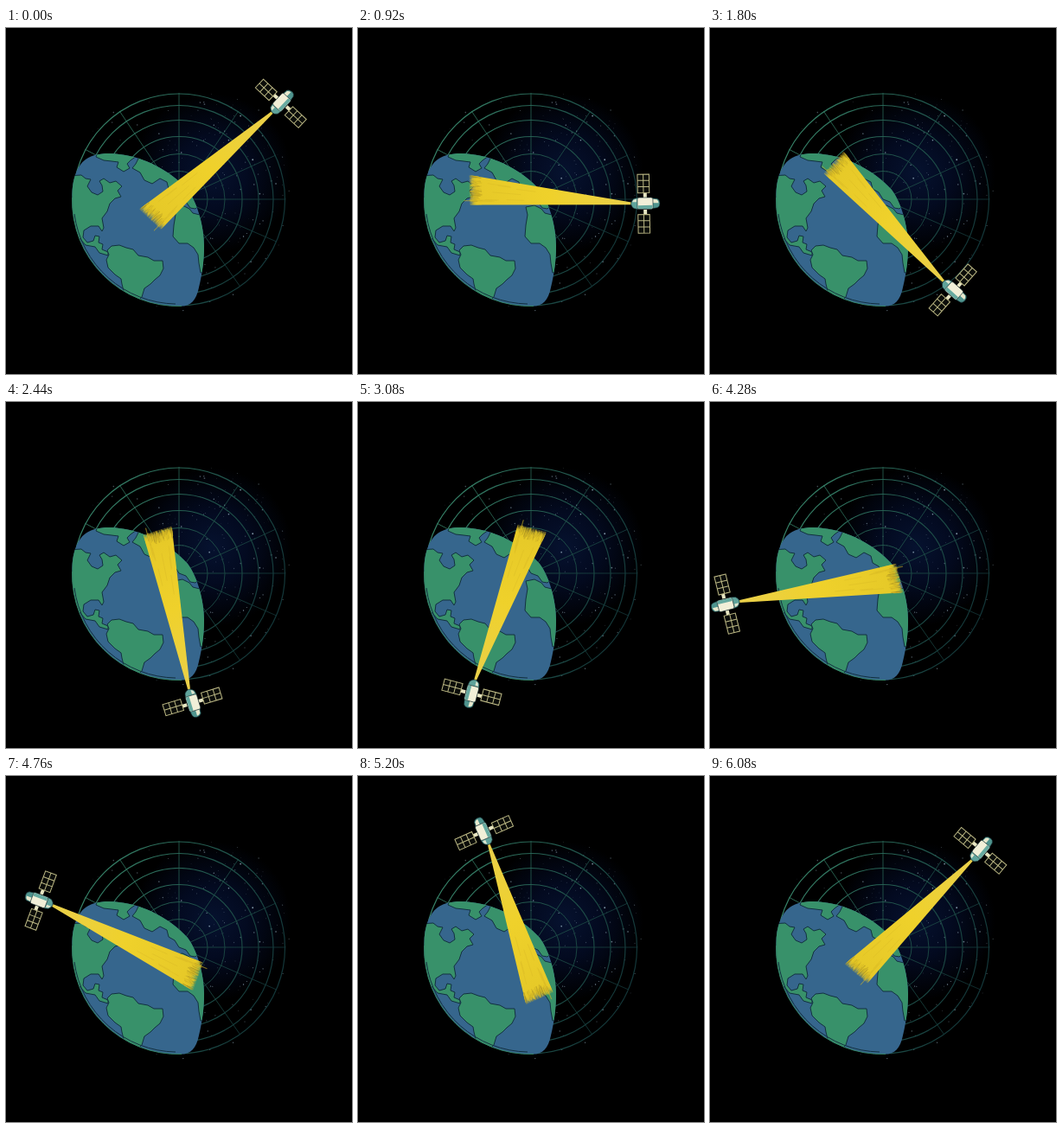
Recreate the animation shown at these times as an HTML page. Size 400x400 px, loop 6.12 s.

```html
<!DOCTYPE html>
<html lang="en">
<head>
<meta charset="utf-8">
<title>Satellite scan</title>
<style>
  html, body { margin: 0; width: 100%; height: 100%; overflow: hidden; background: #000; }
  svg { display: block; width: 100vw; height: 100vh; }
  .land { fill: #38916a; stroke: #123140; stroke-width: 1; stroke-linejoin: round; }
  .panel { fill: #0b0d0a; stroke: #bdb985; stroke-width: 1; }
  .part { stroke: #10252a; stroke-width: .6; }
</style>
</head>
<body>
<svg viewBox="0 0 400 400">
  <defs>
    <radialGradient id="sky" gradientUnits="userSpaceOnUse" cx="238" cy="168" r="92">
      <stop offset="0" stop-color="#06122f"/>
      <stop offset=".45" stop-color="#030a20"/>
      <stop offset="1" stop-color="#000"/>
    </radialGradient>
    <linearGradient id="wire" gradientUnits="userSpaceOnUse" x1="76" y1="150" x2="323" y2="240">
      <stop offset="0" stop-color="#38866a"/>
      <stop offset=".45" stop-color="#245c50"/>
      <stop offset="1" stop-color="#123437"/>
    </linearGradient>
    <linearGradient id="glow" gradientUnits="userSpaceOnUse" x1="-204" y1="0" x2="-16" y2="0">
      <stop offset="0" stop-color="#d9bd28" stop-opacity="0"/>
      <stop offset=".05" stop-color="#e6c928"/>
      <stop offset=".5" stop-color="#efd12b"/>
      <stop offset="1" stop-color="#ead04a"/>
    </linearGradient>
    <path id="egg" d="M76.500 196C76 176 82 159 92 152C102 145 117 144 131 146C160 149 190 165 210 187C222 203 229 231 229 252C229 268 227 283 223 300C220 315 213 321.500 203 321.500A122.500 122.500 0 0 1 76.500 196Z"/>
    <clipPath id="globe"><use href="#egg"/></clipPath>
    <g id="wing">
      <path d="M-2 -13V-7H2V-13Z" fill="#e7e5c2"/>
      <path class="panel" d="M-8.500 -34H5V-12.500H-8.500ZM-1.800 -34V-12.500M-8.500 -26.800H5M-8.500 -19.700H5"/>
    </g>
  </defs>

  <rect width="400" height="400"/>
  <circle cx="238" cy="168" r="92" fill="url(#sky)"/>
  <g id="stars" fill="#9bb4c4"></g>
  <g id="grid" fill="none" stroke="url(#wire)"></g>

  <use href="#egg" fill="#36668d"/>
  <g clip-path="url(#globe)">
    <path class="land" d="M70 171L87 170 92 174 98 175 94 183 99 190 106 193 112 189 111 182 108 177 113 174 120 179 127 177 134 183 129 188 133 195 126 197 120 203 117 212 111 220 113 231 111 235 107 229 98 229 90 234 89 242 94 248 101 246 103 240 108 241 107 248 112 250 111 256 118 259 118 263 108 260 103 253 92 251 78 235 70 210Z"/>
    <path class="land" d="M117 257L122 252 131 251 139 254 147 256 153 263 164 265 171 269 181 269 182 278 178 286 172 291 167 296 160 301 157 311 150 318 136 304 134 296 133 290 126 285 118 277 116 268 119 262Z"/>
    <path class="land" d="M104 149L113 153 122 154 130 155 128 161 136 166 143 162 140 157 144 153 151 148 130 138 108 139Z"/>
    <path class="land" d="M154 149L150 157 146 162 155 167 160 176 169 180 178 174 186 178 188 186 195 190 200 198 208 201 213 208 219 209 228 200 200 155Z"/>
    <path class="land" d="M194 207L204 205 212 209 216 214 224 216 238 240 230 282 225 283 223 272 222 262 217 254 210 249 200 249 193 241 194 228 196 216Z"/>
    <path d="M79 215A120 120 0 0 0 196 319" fill="none" stroke="#123140" stroke-width="1"/>
  </g>
  <path d="M76.500 196A122.500 122.500 0 0 0 203 321.500" fill="none" stroke="#348165" stroke-width="1"/>

  <g id="craft">
    <path d="M-16 -1.800L-203 -36.500V-2L-16 1Z" fill="url(#glow)"/>
    <g id="fray" fill="none"></g>
    <use href="#wing"/>
    <use href="#wing" transform="scale(1 -1)"/>
    <path class="part" fill="#5fa39b" d="M-8 -7L-13 -6Q-16.500 -3 -16.500 0T-13 5.500L-8 6.500Z"/>
    <path class="part" fill="#4f948e" d="M8 -6L14 -5.500Q17 -4 17 0T14 5L8 6Z"/>
    <path fill="#e8e8cd" d="M9 -5L13.500 -4.500Q15.500 -3 15.500 -.5H9Z"/>
    <rect class="part" fill="#f1efd8" x="-9" y="-7" width="18" height="13.500" rx="2"/>
    <path fill="#67aaa0" d="M-8.500 2H8.500V4.500Q8.500 6 7 6H-7Q-8.500 6 -8.500 4.500Z"/>
    <path fill="#dfe5cf" d="M-13.500 -4.500L-10 -5.500V-2H-15Z"/>
  </g>
</svg>

<script>
  // The orbit closes a little later than the loop, which cuts back early.
  const LOOP = 6120, ORBIT = 6150, STEP = 40;
  const $ = id => document.getElementById(id);

  function add(parent, tag, attrs) {
    const el = document.createElementNS("http://www.w3.org/2000/svg", tag);
    for (const k in attrs) el.setAttribute(k, attrs[k]);
    parent.appendChild(el);
  }

  let seed = 11;
  const rand = () => (seed = (seed * 16807) % 2147483647) / 2147483647;

  // Radar grid
  for (const r of [122.5, 109, 92, 73, 53, 33])
    add($("grid"), "circle", { cx: 200, cy: 198.5, r, "stroke-width": r > 70 ? 1.2 : 0.9 });
  for (const deg of [0, 23.5, 55, -24.5, -56, -90, -124, -152]) {
    const a = deg * Math.PI / 180;
    add($("grid"), "path", {
      d: `M200 198L${200 + 123 * Math.cos(a)} ${198 + 123 * Math.sin(a)}l.01 .01`,
      "stroke-width": 0.8
    });
  }

  // Stars, denser on the right
  for (let i = 0; i < 230; i++) {
    const a = rand() * 2 * Math.PI, d = Math.sqrt(rand());
    const wide = i % 4 === 0;
    add($("stars"), "circle", {
      cx: wide ? 205 + 132 * d * Math.cos(a) : 245 + 85 * d * Math.cos(a),
      cy: wide ? 198 + 130 * d * Math.sin(a) : 185 + 110 * d * Math.sin(a),
      r: 0.3 + 0.6 * rand() ** 2,
      opacity: 0.25 + 0.6 * rand()
    });
  }

  // Brushed end of the beam, then a few strokes along it
  for (let i = 0; i < 150; i++) {
    const y = -36.5 + 34 * rand(), dark = rand() < 0.3;
    add($("fray"), "path", {
      d: `M${-188 - 7 * rand()} ${y * 0.96}L${-197 - 6 * rand()} ${y}`,
      stroke: dark ? "#a88f24" : "#e6c928",
      "stroke-width": 0.4 + 0.4 * rand(),
      opacity: 0.55
    });
  }
  for (let i = 0; i < 9; i++) {
    const k = -0.17 + 0.15 * rand(), x = 105 + 60 * rand(), len = 12 + 25 * rand();
    add($("fray"), "path", {
      d: `M${-16 - x} ${k * x}L${-16 - x - len} ${k * (x + len)}`,
      stroke: "#d6b726", "stroke-width": 0.6, opacity: 0.6
    });
  }

  // Flight path: time, x, y, heading in degrees
  const path = [
    [0, 319, 86, -47], [920, 332, 203, -1], [1800, 282, 304, 41.5],
    [2440, 216, 348, 73], [3080, 131, 337, 104.8], [3840, 50, 289, 142],
    [4280, 18, 234, 166], [4700, 30, 155, 195], [5200, 145, 64, 246],
    [5480, 222, 48, 272], [5760, 281, 64, 292], [6080, 313.5, 85, 309.8]
  ];

  function key(i) {
    const n = path.length, turn = Math.floor(i / n);
    const [t, x, y, a] = path[i - turn * n];
    return [t + turn * ORBIT, x, y, a + turn * 360];
  }

  function slope(i, c) {
    const p = key(i - 1), q = key(i), r = key(i + 1);
    const h = q[0] - p[0], k = r[0] - q[0];
    return ((q[c] - p[c]) / h * k + (r[c] - q[c]) / k * h) / (h + k);
  }

  function pose(t) {
    let i = path.length - 1;
    while (path[i][0] > t) i--;
    const p = key(i), q = key(i + 1), h = q[0] - p[0], s = (t - p[0]) / h;
    const e = s * s * (3 - 2 * s);
    return [1, 2, 3].map(c =>
      p[c] + (q[c] - p[c]) * e +
      h * s * (1 - s) * ((1 - s) * slope(i, c) - s * slope(i + 1, c)));
  }

  function draw(now) {
    const t = Math.floor(now % LOOP / STEP) * STEP;
    const [x, y, a] = pose(t);
    $("craft").setAttribute("transform", `translate(${x} ${y}) rotate(${a})`);
  }

  const start = performance.now();
  function tick() {
    draw(performance.now() - start);
    requestAnimationFrame(tick);
  }
  tick();
</script>
</body>
</html>
```
